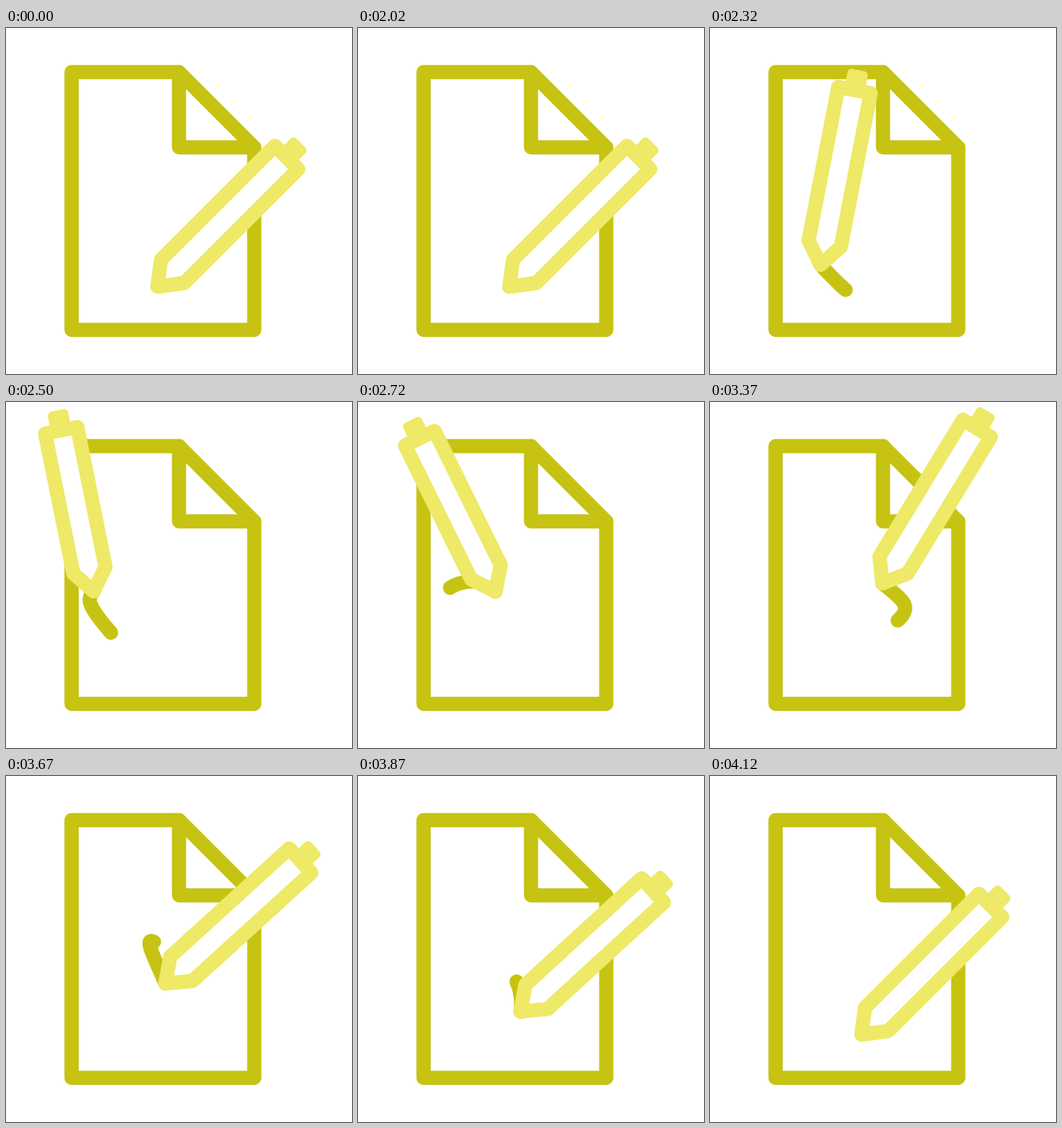
An HTML page with a canvas that plays this animation: 400x400 px, repeating every 4.15 s.

```html
<!DOCTYPE html>
<html lang="en">
<head>
<meta charset="utf-8">
<title>Writing pen</title>
<style>
html, body { margin: 0; width: 100%; height: 100%; overflow: hidden; background: #fff; }
canvas { display: block; width: 400px; height: 400px; }
</style>
</head>
<body>
<canvas id="stage"></canvas>
<script>
const LOOP = 4150, SIZE = 400, START = 2020, END = 4120;
const INK = '#c6c313', PEN = '#eee966', LINE = 16.5;
const TRAIL = 57, CAP = 23.5;

// Both ends of the pen run along smooth closed curves, in even time steps
const tipPath = [[175, 299], [156, 302], [97, 231], [139, 208], [197, 251],
  [214, 255], [223, 231], [167, 191], [186.5, 247], [187, 277], [175, 299]];
const capPath = [[341, 133], [242, 81], [84, 13], [41.5, 20], [132, 21],
  [254, 22], [316, 17], [322, 12], [361, 91], [356, 120], [341, 133]];

const canvas = document.getElementById('stage');
const ctx = canvas.getContext('2d');
const ratio = window.devicePixelRatio || 1;
canvas.width = canvas.height = SIZE * ratio;
ctx.scale(ratio, ratio);
ctx.lineWidth = LINE;
ctx.lineCap = ctx.lineJoin = 'round';

const clamp = v => Math.max(0, Math.min(1, v));

// Catmull-Rom; neighbours mirror at the ends, so the motion starts and stops at rest
function along(path, t) {
  const last = path.length - 1;
  const pos = clamp((t - START) / (END - START)) * last;
  const i = Math.min(last - 1, Math.floor(pos)), u = pos - i;
  const at = k => path[last - Math.abs(last - Math.abs(k))];
  const [a, b, c, d] = [at(i - 1), at(i), at(i + 1), at(i + 2)];
  return [0, 1].map(n => b[n] + u / 2 * (c[n] - a[n] +
    u * (2 * a[n] - 5 * b[n] + 4 * c[n] - d[n] +
    u * (3 * (b[n] - c[n]) + d[n] - a[n]))));
}

function trace(points, close) {
  ctx.beginPath();
  points.forEach(p => ctx.lineTo(p[0], p[1]));
  if (close) ctx.closePath();
}

function drawPage() {
  const left = 75.75, right = 287, top = 51, bottom = 349, fold = 87;
  const inner = right - fold, low = top + fold;
  ctx.strokeStyle = INK;
  trace([[left, top], [inner, top], [right, low], [right, bottom], [left, bottom]], true);
  ctx.stroke();
  trace([[inner, top], [inner, low], [right, low]]);
  ctx.stroke();
}

// Follows the tip back in time until the ink length is used up
function drawTrail(t) {
  let left = TRAIL * clamp((t - START) / 420) * clamp((END - t) / 400);
  if (left <= 0) return;
  let [x, y] = along(tipPath, t);
  const points = [[x, y]];
  for (let s = t - 3; s > START && left > 0; s -= 3) {
    const [px, py] = along(tipPath, s);
    const d = Math.hypot(px - x, py - y);
    const k = d > left ? left / d : 1;
    x += (px - x) * k;
    y += (py - y) * k;
    left -= d;
    points.push([x, y]);
  }
  trace(points);
  ctx.stroke();
}

function drawPen(t) {
  const [x, y] = along(tipPath, t);
  const [cx, cy] = along(capPath, t);
  const len = Math.hypot(cx - x, cy - y);
  const top = len - CAP, half = 19;
  ctx.save();
  ctx.translate(x, y);
  ctx.rotate(Math.atan2(cx - x, y - cy));
  ctx.fillStyle = PEN;
  ctx.beginPath();
  ctx.roundRect(-12, -len, 24, CAP, [5, 5, 0, 0]);
  ctx.fill();
  trace([[0, 0], [-half, -25], [-half, -top], [half, -top], [half, -25]], true);
  ctx.fillStyle = '#fff';
  ctx.fill();
  ctx.strokeStyle = PEN;
  ctx.stroke();
  ctx.restore();
}

function frame() {
  const t = performance.now() % LOOP;
  ctx.fillStyle = '#fff';
  ctx.fillRect(0, 0, SIZE, SIZE);
  drawPage();
  drawTrail(t);
  drawPen(t);
  requestAnimationFrame(frame);
}
frame();
</script>
</body>
</html>
```
